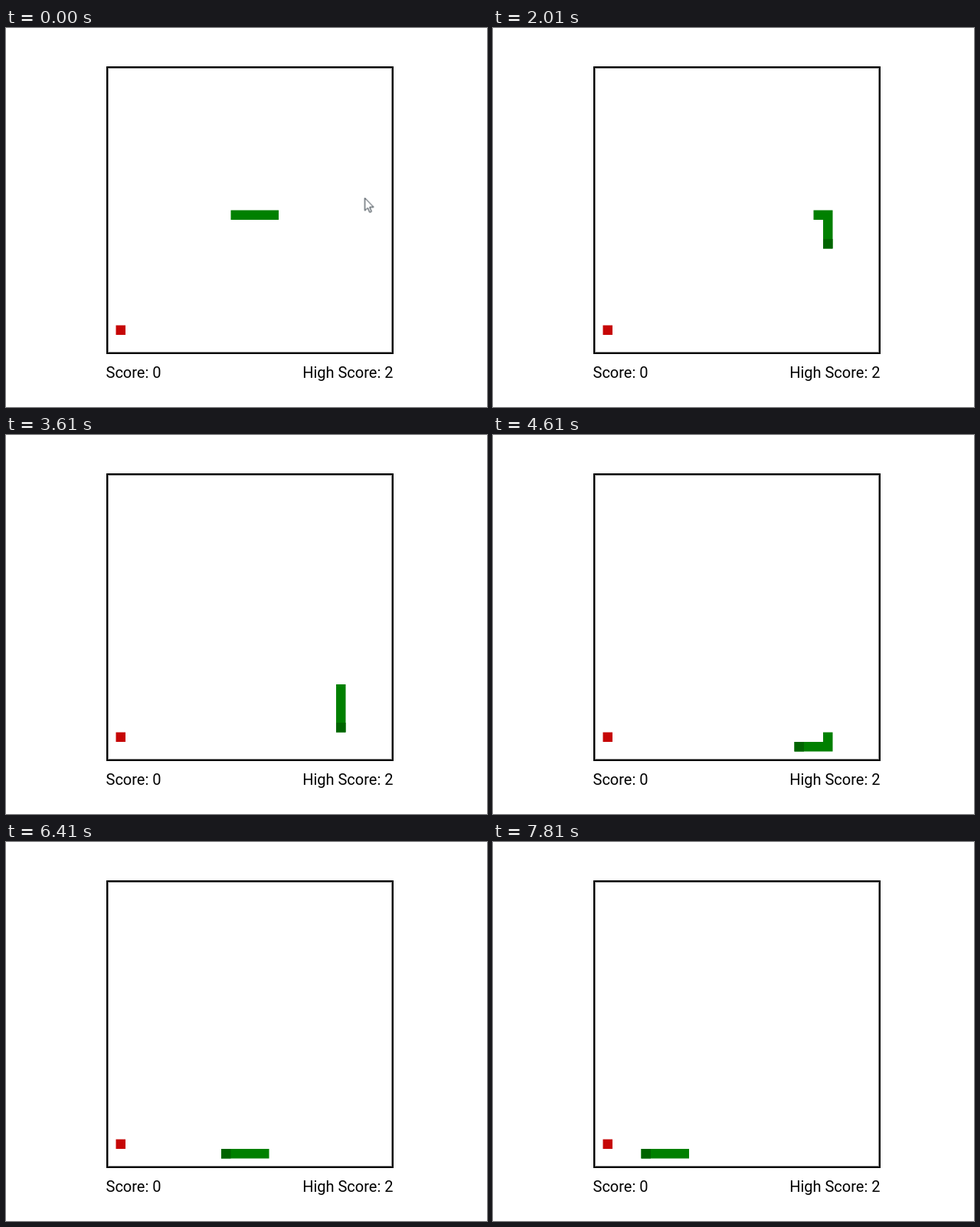
Animation, 628 px wide and 494 px high, one loop 8000 ms. Source, as an HTML page:

```html
<!DOCTYPE html>
<html lang="en">
<head>
<meta charset="utf-8">
<title>Snake</title>
<style>
  html, body { margin: 0; width: 100%; height: 100%; overflow: hidden; background: #fff; }
  svg { display: block; width: 628px; height: 494px; }
  text { font: 20px Roboto, sans-serif; }
  #cursor { animation: leave 8s step-end infinite; }
  @keyframes leave {
    0% { transform: translate(468.5px, 221.5px); }
    0.875% { transform: translate(490.5px, 218.5px); }
    1.75% { transform: translate(546.5px, 222.5px); }
    2.625% { transform: translate(612.5px, 231.5px); }
    3.5%, 100% { transform: translate(700px, 231.5px); }
  }
</style>
</head>
<body>
<svg viewBox="0 0 628 494">
  <rect x="132" y="51" width="373" height="373" fill="none" stroke="#000" stroke-width="2"/>
  <rect x="133.5" y="52.5" width="370" height="370" fill="none" stroke="#8c8c8c"/>
  <g transform="translate(131 50) scale(12.5)">
    <rect x="1" y="27" width="1" height="1" fill="#c60606"/>
    <polyline id="body" fill="none" stroke="#008000" stroke-linecap="square"/>
    <rect id="head" width="1" height="1"/>
  </g>
  <text x="130.5" y="456">Score: 0</text>
  <text x="505.5" y="456" text-anchor="end">High Score: 2</text>
  <path id="cursor" d="M0 0V16.5L3.8 13L6.3 18.8L8.8 17.7L6.3 12H11.5Z" fill="#fff" stroke="#14202a"/>
</svg>
<script>
  const LOOP = 8000, STEP = 200, LENGTH = 5;
  const body = document.getElementById('body');
  const head = document.getElementById('head');

  // Grid cell of the head after a number of moves: right, down, then left.
  function cellAt(move) {
    if (move <= 7) return [17 + move, 15];
    if (move <= 20) return [24, 8 + move];
    return [44 - move, 28];
  }

  function draw(time) {
    const move = Math.max(0, Math.floor((time - 10) / STEP));
    const cells = Array.from({ length: LENGTH }, (_, i) => cellAt(move - i));
    body.setAttribute('points', cells.map(([x, y]) => `${x + 0.5},${y + 0.5}`).join(' '));
    head.setAttribute('x', cells[0][0]);
    head.setAttribute('y', cells[0][1]);
    head.setAttribute('fill', move ? '#006400' : 'none');
  }

  const cursorMotion = document.getElementById('cursor').getAnimations()[0];
  cursorMotion.pause();

  function tick() {
    const time = performance.now() % LOOP;
    cursorMotion.currentTime = time;
    draw(time);
    requestAnimationFrame(tick);
  }
  tick();
</script>
</body>
</html>
```
